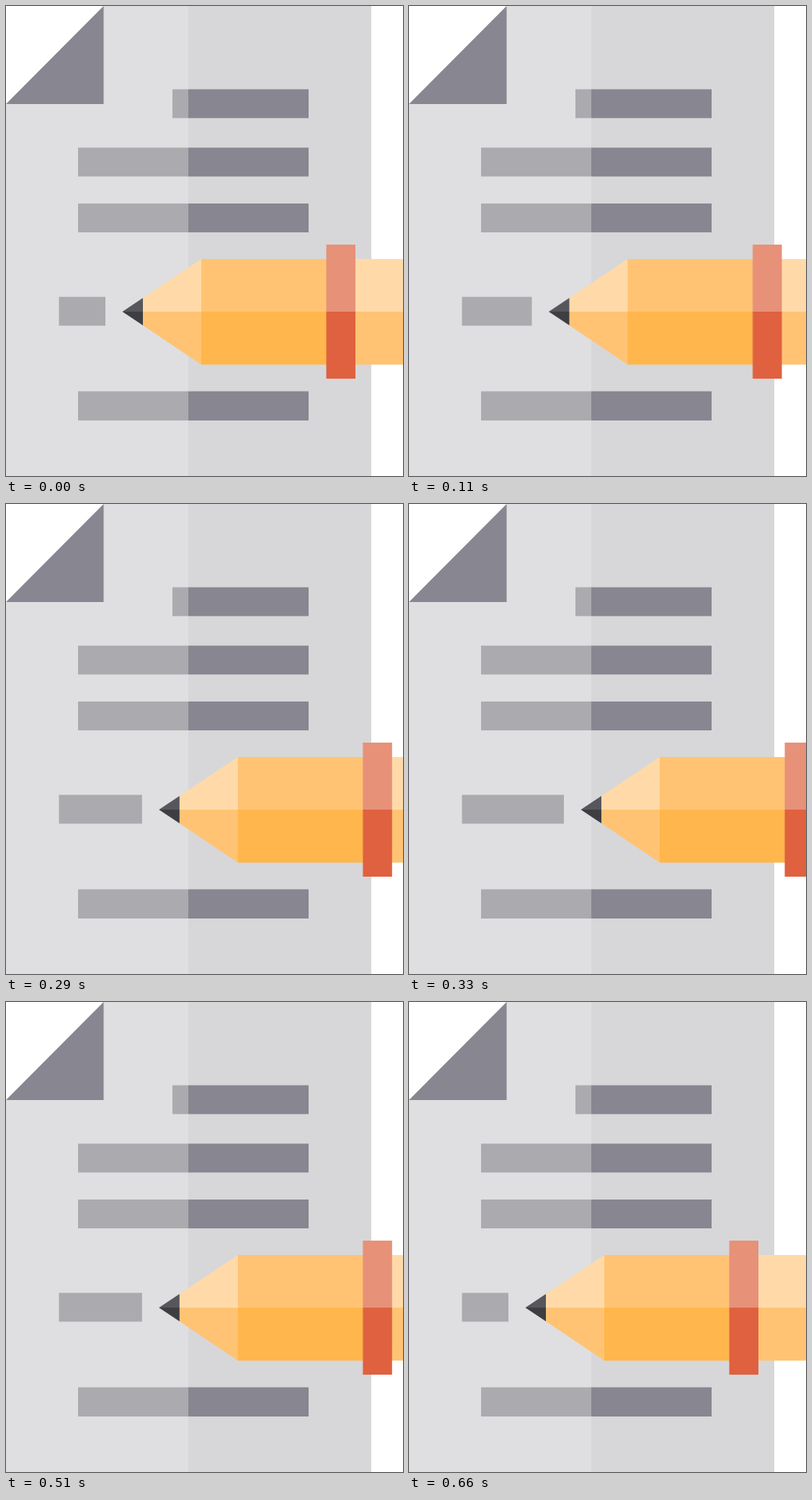
These frames come from a looping animation (551x652 px, 770 ms). An HTML page:

```html
<!DOCTYPE html>
<html lang="en">
<head>
<meta charset="utf-8">
<title>Pencil writing on a page</title>
<style>
  html, body { margin: 0; width: 100%; height: 100%; overflow: hidden; background: #fff; }
  svg { display: block; width: 551px; height: 652px; }
  .dark { fill: #888690; }
  .mid { fill: #abaaaf; }
  .pale { fill: #ffdaa8; }
  .soft { fill: #ffc373; }
  .deep { fill: #ffb64c; }
</style>
</head>
<body>
<svg viewBox="0 0 551 652">
  <path fill="#dfdfe1" d="M135.5 0H253V652H0V136Z"/>
  <path fill="#d7d7d9" d="M253 0H507V652H253Z"/>
  <path class="dark" d="M135.5 0V136H0Z"/>

  <path class="mid" d="M231 115.5H253V155.5H231ZM100 196.5H253V236.5H100ZM100 274H253V314H100ZM100 534.5H253V575H100Z"/>
  <path class="dark" d="M253 115.5H420V155.5H253ZM253 196.5H420V236.5H253ZM253 274H420V314H253ZM253 534.5H420V575H253Z"/>
  <rect id="line" class="mid" x="73.5" y="403.5" width="64.5" height="40"/>

  <g id="pencil">
    <path class="pale" d="M190 424V405L271 351V424ZM485 351H551V424H485Z"/>
    <path class="soft" d="M190 424V443L271 497.5V424ZM271 351H445V424H271ZM485 424H551V497.5H485Z"/>
    <path class="deep" d="M271 424H445V497.5H271Z"/>
    <path fill="#57565c" d="M161.5 424L190 405V424Z"/>
    <path fill="#3e3d42" d="M161.5 424L190 443V424Z"/>
    <path fill="#e69178" d="M444.5 331H485V424H444.5Z"/>
    <path fill="#df6140" d="M444.5 424H485V517H444.5Z"/>
  </g>
</svg>
<script>
  const shifts = [0, 32.5, 50.8, 77, 50.8, 32.5, 0];
  const timing = { duration: 770, iterations: Infinity };

  // Each pose is held for an equal share of the loop.
  function play(id, pose) {
    const steps = shifts.map((x, i) => ({
      ...pose(x), offset: i / shifts.length, easing: "step-end"
    }));
    steps.push({ ...pose(shifts[0]), offset: 1 });
    document.getElementById(id).animate(steps, timing);
  }

  play("pencil", x => ({ transform: `translateX(${x}px)` }));
  play("line", x => ({ width: `${64.5 + x}px` }));
</script>
</body>
</html>
```
